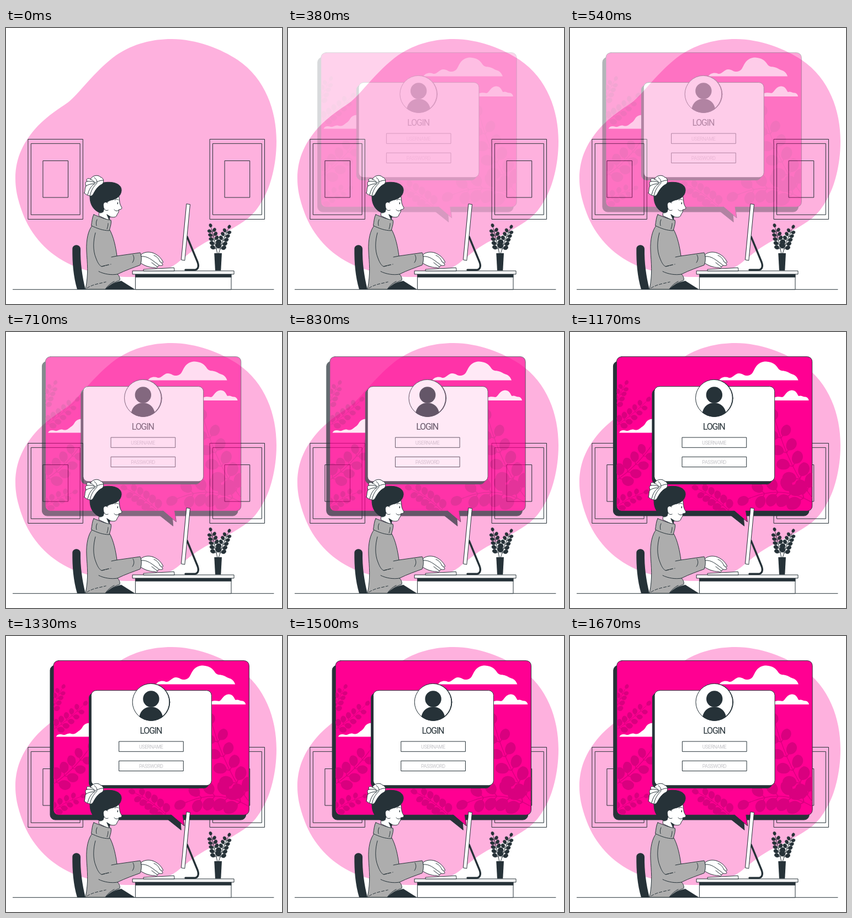
An HTML page that plays this animation: 500x500 px, repeating every 1710 ms.

```html
<!DOCTYPE html>
<html lang="en">
<head>
<meta charset="utf-8">
<title>Login</title>
<style>
  html, body { margin: 0; width: 100%; height: 100%; overflow: hidden; background: #fff; }
  svg { display: block; width: 100vw; height: 100vh; }
  .line { fill: none; stroke: #263238; stroke-width: 1; stroke-linecap: round; stroke-linejoin: round; }
  .white { fill: #fff; }
  .grey { fill: #adadad; }
  .pink { fill: #ff0092; }
  .dark { fill: #263238; }
  .cloud { fill: #fff; }
  text { font-family: Roboto, "Open Sans", sans-serif; text-anchor: middle; }
  .title { font-size: 16px; letter-spacing: -1.2px; fill: #263238; }
  .hint { font-size: 9px; letter-spacing: -.45px; fill: #c4c4c8; }
  #bubble { animation: slide 1.71s cubic-bezier(.36, -.01, .5, 1.38) infinite; }
  @keyframes slide {
    from { opacity: 0; transform: translateX(-30px); }
    to { opacity: 1; transform: translateX(0); }
  }
</style>
</head>
<body>
<svg viewBox="0 0 500 500">
  <defs>
    <clipPath id="panelClip"><rect x="84.5" y="45" width="354" height="279" rx="9"/></clipPath>
    <g id="picture" class="line">
      <rect x="40.3" y="201.5" width="99" height="145"/>
      <rect x="45.7" y="209.3" width="88.4" height="129"/>
      <rect x="67.3" y="240.5" width="45.2" height="66.5"/>
    </g>
  </defs>

  <path fill="#feb1de" d="M300 20C345 20 390 38 420 58C470 92 490 150 490 205C490 250 478 288 468 306C457 327 447 338 437 346C415 362 390 374 370 384C345 396 330 410 310 426C285 444 255 451 230 451C190 452 150 442 120 430C75 410 45 375 30 335C20 308 17 290 17 272C17 235 32 205 58 177C78 157 95 147 112 135C130 122 160 78 200 49C232 28 265 20 300 20Z"/>
  <use href="#picture"/>
  <use href="#picture" x="329.2"/>

  <g id="bubble">
    <g class="line dark">
      <rect x="78.3" y="53" width="354.5" height="280" rx="9"/>
      <path d="M291 332L315.5 351.5L314 332Z"/>
    </g>
    <rect class="line pink" x="84.3" y="44.7" width="354.3" height="279.6" rx="9"/>
    <path class="pink" d="M297 323L321.3 344L318.5 323Z"/>
    <path class="line" d="M297 324.3L321.3 344L318.5 324.3"/>
    <g id="foliage" clip-path="url(#panelClip)"></g>
    <path class="cloud" d="M270 87.6C273 82 281 80 288 83C294 84 298 76 305 75C312 74 315 80 322 79C331 78 332 70 336 64C341 56 348 53.5 355 53.5C366 54 373 59 377 66C381 72 387 69 393 72C398 74 400 76 404 77C409 79 412 83 413.5 87.6Z"/>
    <path class="cloud" d="M365 124C367 118 375 116 384 118C389 118 391 106 402 105.500C410 106 411 112 414 116C419 114 422 118 426 117.500C430 118 432 121 432.500 124Z"/>
    <path class="cloud" d="M89 182.500C91 178 96 177 102 179C107 180 110 175 116 177C123 179 126 175 130 172C135 169 136 166 138 163C142 158 149 156 160 158V182.500Z"/>

    <rect class="line dark" x="148.800" y="103" width="217" height="172.500" rx="9"/>
    <rect class="line white" x="152.600" y="98.600" width="218" height="172.200" rx="9"/>
    <circle class="line dark" cx="261.600" cy="119.900" r="33.500"/>
    <circle class="line white" cx="260.800" cy="119.700" r="33.400"/>
    <circle class="dark" cx="261.200" cy="114" r="14.700"/>
    <path class="dark" d="M239.700 146C242 135 250 128.300 261 128.300S280 135 282.300 146C270 156 252 156 239.700 146Z"/>
    <text class="title" x="260.600" y="176.600">LOGIN</text>
    <rect class="line" x="203.300" y="191" width="116.300" height="18.300"/>
    <rect class="line" x="203.300" y="226.200" width="116.300" height="18.300"/>
    <text class="hint" x="261" y="203.800">USERNAME</text>
    <text class="hint" x="261" y="239.400">PASSWORD</text>
  </g>

  <!-- desk -->
  <path class="line" d="M12.500 473.700H485"/>
  <rect class="line white" x="234.800" y="446" width="173.200" height="27.700"/>
  <rect class="dark" x="234.500" y="446" width="173.800" height="5.800"/>
  <rect class="line white" x="229.500" y="440" width="183.500" height="6"/>
  <path class="line" style="stroke-width:3.4" d="M328 378L347 424C350 432 348 438 341 438.300H325"/>
  <path class="line white" d="M327.300 318.700L333.500 319.600L323.800 421.200L317.800 420Z"/>
  <path class="line white" d="M249 439.800V437.300L304.500 434.300L305 439.800Z"/>
  <path class="dark" d="M377.300 408H391L389.300 439.500H379Z"/>
  <g id="plant"></g>

  <!-- chair and person -->
  <path class="dark" d="M120.300 400C120.500 391 134.500 391 135 400C134.500 425 138 450 144 473.700H129C122 450 120 425 120.300 400Z"/>
  <path class="dark" d="M178 473.700C187 466 197 460 209 458L234 473.700Z"/>

  <g class="line">
    <path class="white" d="M245 410C250 406 258 405 265 407C274 410 281 416 284.500 424C284 427 281 426 278 422C280 425 284 426 284 429.500C280 432 273 429 268 425C262 422 252 422 245 424Z"/>
    <path class="white" d="M245 414C252 413 258 416 264 420L275 428C278 430 277 433 273 432C276 434 273 436 269 434C260 434 252 431 244 426Z"/>
    <path d="M268 412C274 414 276 418 279 423M264 425L273 432"/>
    <path class="grey" d="M156 358C149 367 145 383 146 404C147 425 150 444 144 473.300H180C188 465 198 460 206 457C207 453 205 449 202 446C216 439 231 434 243 429.500C246 423 246 413 243 407C229 409 215 411 201 413C199 398 195 377 187 364Z"/>
    <path d="M162 371C158 385 157 403 163 417C166 425 169 430 173 432L185 429M201 413L191 415M202 446C191 448 178 446 168 441M180 473C184 467 190 462 196 459M230 411C233 416 232 421 229 425"/>
    <path stroke-dasharray="5 3" d="M174 432L190 428M147 471C158 464 170 463 181 460"/>
    <path class="white" d="M170 325L168 340L187 349L186 341C193 344 199 343 200.500 340C201 337 203 336 204 333L204.500 329C208 329 210 328 209.800 325.500C208 322 205.500 318 205.800 314L204 300L180 304Z"/>
    <path class="dark" d="M183 338L188.500 341.500L187 347Z"/>
    <path class="grey" d="M159 338C169 342 180 347 190 348C191.500 353 189 360 187 367C175 367 165 363 154.500 358C156 350 156 343 159 338Z"/>
    <path d="M165 347C163 351 163 355 164 358M185 354C185 358 184 361 183 364"/>
    <path class="dark" d="M171 335C159 331 152 320 152 306C152 291 165 280 184 279.300C200 279 210 285 209 295C208 304 201 309 194 311C188 312 184 314 181 318C178 322 178 328 176 333Z"/>
    <path class="white" d="M184 317C180 313 175 317 176.500 323C177 329 181 332 185 330"/>
    <path d="M197 312C199 310 202 310 204 311.500M196 329C198 332 202 332 204 330"/>
    <ellipse class="dark" stroke="none" cx="202.300" cy="317.500" rx=".8" ry="2"/>
    <path class="white" d="M142 299C144 294 142 290 145 286C143 281 144 278 147 278C144 273 149 271 153 274C156 267 167 265 171 270C178 272 178 280 174 283C167 286 163 292 159 299C157 304 154 305 151 304C147 303 144 301 142 299Z"/>
    <path d="M153 274C156 275 159 277 161 280M147 278C153 277 158 278 162 281C167 277 171 276 176 276M145 286C150 283 156 282 161 282C154 286 150 293 148 302M165 281C158 287 154 295 152 304M160 271C163 273 165 276 165 279"/>
  </g>
</svg>
<script>
  const NS = "http://www.w3.org/2000/svg";

  function add(parent, name, attrs) {
    const el = document.createElementNS(NS, name);
    for (const key in attrs) el.setAttribute(key, attrs[key]);
    parent.appendChild(el);
  }

  // Curved stem with paired leaves that shrink towards the tip.
  function branch(parent, color, [x0, y0, cx, cy, x1, y1], pairs, size, start = .15) {
    const leaf = (x, y, deg, len) => add(parent, "path", {
      d: "M0 0L.22 0C.3-.3.75-.42 1-.15C1.1.12.85.34.6.31C.4.3.28.15.22 0",
      fill: color, stroke: color, "stroke-width": .06,
      transform: `translate(${x} ${y}) rotate(${deg}) scale(${len})`
    });
    add(parent, "path", {
      d: `M${x0} ${y0}Q${cx} ${cy} ${x1} ${y1}`,
      fill: "none", stroke: color, "stroke-width": size > 15 ? 1.3 : 1
    });
    for (let i = 0; i <= pairs; i++) {
      const t = start + (1 - start) * i / pairs, s = 1 - t;
      const x = s * s * x0 + 2 * s * t * cx + t * t * x1;
      const y = s * s * y0 + 2 * s * t * cy + t * t * y1;
      const dir = Math.atan2(s * (cy - y0) + t * (y1 - cy), s * (cx - x0) + t * (x1 - cx)) * 180 / Math.PI;
      const len = size * (1.08 - .3 * t);
      if (i === pairs) leaf(x, y, dir, len);
      else for (const side of [-52, 52]) leaf(x, y, dir + side, len);
    }
  }

  const foliage = document.getElementById("foliage"), shade = "#d9007f";
  branch(foliage, shade, [80, 172, 108, 155, 137, 127], 5, 15);
  branch(foliage, shade, [80, 142, 88, 115, 99, 97], 4, 13);
  branch(foliage, shade, [78, 272, 115, 250, 146, 208], 4, 25);
  branch(foliage, shade, [78, 322, 100, 302, 131, 292], 4, 15);
  branch(foliage, shade, [296, 332, 268, 302, 235, 286], 5, 19);
  branch(foliage, shade, [448, 312, 400, 255, 373, 164], 5, 31, .2);
  branch(foliage, shade, [446, 314, 390, 275, 328, 300], 4, 32, .2);

  const plant = document.getElementById("plant"), ink = "#263238";
  branch(plant, ink, [383, 409, 378, 385, 372, 363], 5, 11, .18);
  branch(plant, ink, [385, 409, 392, 385, 402, 365], 5, 11, .18);
</script>
</body>
</html>
```
